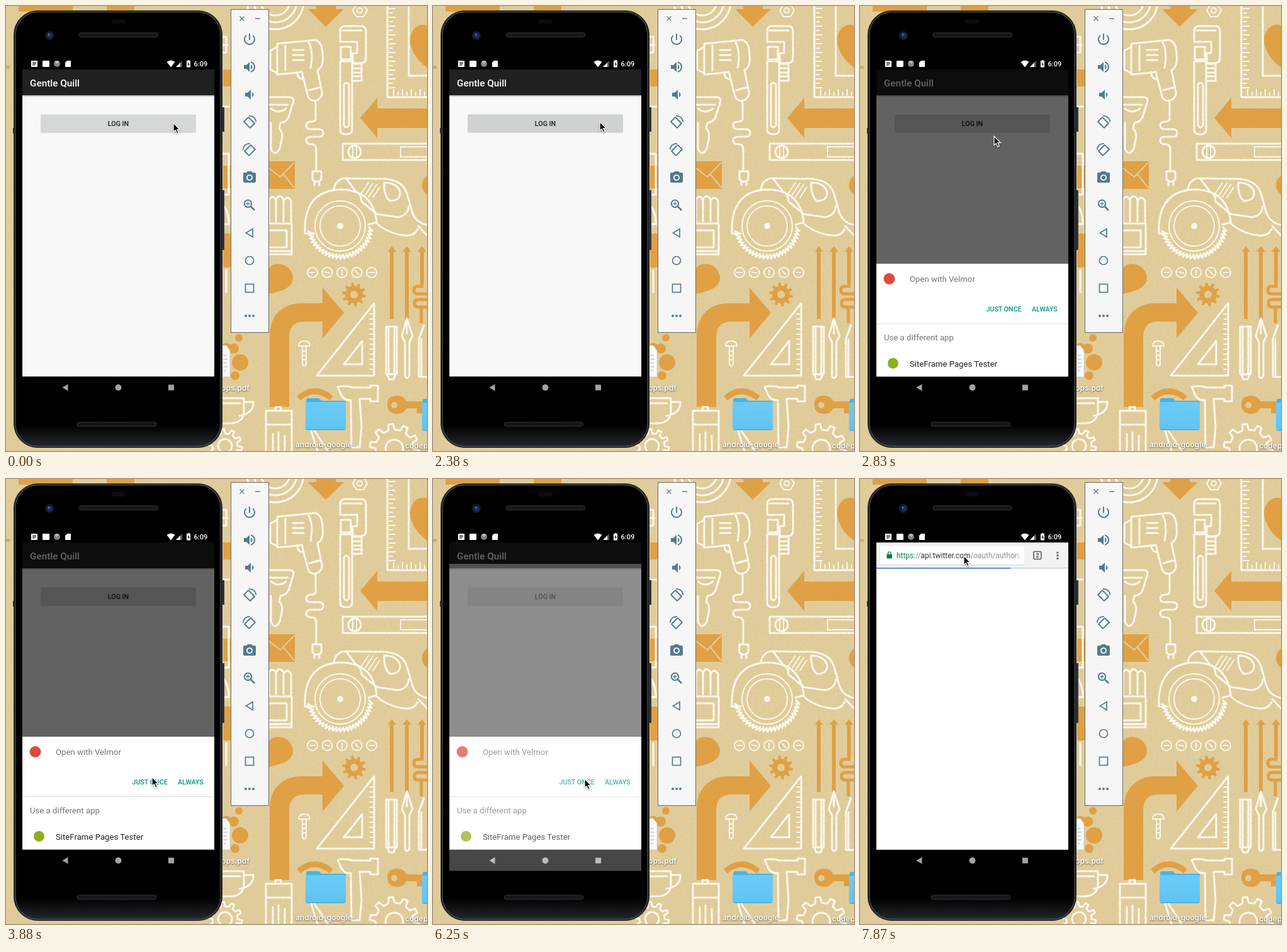
Recreate the animation shown at these times as an HTML page. Size 669 px wide and 708 px high, loop 8 s.

```html
<!DOCTYPE html>
<html lang="en">
<head>
<meta charset="utf-8">
<title>Phone log in</title>
<style>
html, body { margin: 0; width: 100%; height: 100%; overflow: hidden; background: #dfca98; }
svg { display: block; width: 100%; height: 100%; }
text { font-family: Roboto, sans-serif; font-size: 13.2px; }
.med { font-weight: 500; }
.line { fill: none; stroke: #fffaf0; stroke-width: 3; stroke-linecap: round; stroke-linejoin: round; }
.thin { stroke-width: 2; }
.solid { fill: #fffaf0; stroke: none; }
.orange { fill: #e1a043; }
.orange-line { fill: none; stroke: #e1a043; }
.label { font: 600 12px Inter, sans-serif; fill: #fff; filter: drop-shadow(0 1px 1px #0009); }
.tool { fill: #537a8b; }
.tool-line { fill: none; stroke: #537a8b; stroke-width: 2; }
.hint { fill: #757575; }
.teal { fill: #009688; }
.small { font-size: 10.7px; font-weight: 500; }

.anim { animation: 8s step-end infinite; }
#cursor { animation-name: cursor; }
#press { animation-name: press; }
#dim { animation-name: dim; }
#sheet { animation-name: sheet; }
#blank { animation-name: blank; }
#ready { animation-name: ready; }
#ripple { animation-name: ripple; }
#page { animation-name: page; }
#bar { animation-name: bar; }
#url { animation-name: url; }
#load { animation-name: load; transform-origin: 26px 0; }

@keyframes cursor {
  0% { transform: translate(266px, 186px); }
  5.5% { transform: translate(266px, 187px); }
  7.375% { transform: translate(266px, 185px); }
  13% { transform: translate(265px, 184px); }
  31.625% { transform: translate(260px, 184px); }
  33.5% { transform: translate(246px, 189px); }
  35.375% { transform: translate(213px, 207px); }
  37.25% { transform: translate(190px, 330px); }
  39.125% { transform: translate(181px, 446px); }
  42.875% { transform: translate(184px, 452px); }
  44.75% { transform: translate(194px, 461px); }
  46.625% { transform: translate(211px, 469px); }
  48.5% { transform: translate(232px, 474px); }
  50.25% { transform: translate(253px, 476px); }
  52.125% { transform: translate(269px, 475px); }
  54% { transform: translate(279px, 473px); }
  55.875% { transform: translate(283px, 471px); }
  63.375% { transform: translate(248px, 477px); }
  65.25% { transform: translate(241px, 477px); }
  80% { transform: translate(240px, 468px); }
  81.75% { transform: translate(230px, 390px); }
  83.625% { transform: translate(212px, 287px); }
  87.25% { transform: translate(207px, 265px); }
  89.125% { transform: translate(196px, 222px); }
  91% { transform: translate(183px, 176px); }
  92.875% { transform: translate(173px, 144px); }
  94.625% { transform: translate(167px, 128px); }
  96.5%, 100% { transform: translate(165px, 122px); }
}
@keyframes press {
  0% { opacity: 0; }
  24.25% { opacity: .03; }
  26.125% { opacity: .024; }
  31.625%, 100% { opacity: 0; }
}
@keyframes dim {
  0% { opacity: 0; }
  31.625% { opacity: .105; }
  33.5% { opacity: .5; }
  35.375%, 100% { opacity: .6; }
}
@keyframes sheet {
  0% { opacity: 0; }
  31.625% { opacity: .82; transform: translateY(14px); }
  33.5%, 100% { opacity: 1; transform: none; }
}
@keyframes blank {
  0% { opacity: 1; }
  33.5%, 100% { opacity: 0; }
}
@keyframes ready {
  0% { opacity: 0; }
  33.5%, 100% { opacity: 1; }
}
@keyframes ripple {
  0% { opacity: 0; }
  70.875% { opacity: .06; }
  72.75% { opacity: .1; }
  74.625% { opacity: .07; }
  76.375%, 100% { opacity: 0; }
}
@keyframes page {
  0% { opacity: 0; transform: translateY(34px); }
  78.125% { opacity: .28; transform: translateY(34px); }
  80% { opacity: .96; transform: translateY(5px); }
  81.75%, 100% { opacity: 1; transform: none; }
}
@keyframes bar {
  0% { opacity: 0; }
  81.75%, 100% { opacity: 1; }
}
@keyframes url {
  0% { opacity: 0; }
  87.25%, 100% { opacity: 1; }
}
@keyframes load {
  0% { transform: scaleX(0); }
  87.25% { transform: scaleX(.1); }
  89.125% { transform: scaleX(.28); }
  91% { transform: scaleX(.44); }
  92.875% { transform: scaleX(.55); }
  94.625% { transform: scaleX(.63); }
  96.5% { transform: scaleX(.67); }
  98.375%, 100% { transform: scaleX(.7); }
}
</style>
</head>
<body>
<svg viewBox="0 0 669 708" preserveAspectRatio="none">
<defs>
  <filter id="grain" x="0" y="0" width="100%" height="100%">
    <feTurbulence type="fractalNoise" baseFrequency=".28" numOctaves="3" seed="4"/>
    <feColorMatrix values="0 0 0 0 .5  0 0 0 0 .38  0 0 0 0 .18  1.1 0 0 0 -.5"/>
  </filter>
  <linearGradient id="foot" x2="0" y2="1">
    <stop offset=".95" stop-color="#000"/><stop offset="1" stop-color="#25272b"/>
  </linearGradient>
  <linearGradient id="blue" x2="0" y2="1">
    <stop offset="0" stop-color="#6ccbf7"/><stop offset="1" stop-color="#5fc4f3"/>
  </linearGradient>
  <linearGradient id="fade"><stop offset="0" stop-color="#fff" stop-opacity="0"/><stop offset="1" stop-color="#fff"/></linearGradient>
  <pattern id="weave" width="4" height="4" patternUnits="userSpaceOnUse">
    <rect width="4" height="4" fill="#f8f8f8"/><path d="M0 4L4 0" stroke="#f0f0f0"/>
  </pattern>
  <clipPath id="screen"><rect x="26" y="101" width="305" height="523"/></clipPath>
  <clipPath id="box"><rect x="32" y="107" width="224" height="29"/></clipPath>
</defs>

<!-- wallpaper -->
<rect width="669" height="708" fill="#e1cd9b"/>
<g class="orange">
  <path d="M20 0H106V9H20zM160 0h44v8h-44zM345 101h12v27h-12zM345 254h12v36h-12zM345 362h12v54h-12z"/>
  <path d="M493 0h31v5h13L508 33 480 5h13z"/>
  <path d="M669 31q-12-4-21 6-10 14-3 31 6 17 24 30z"/>
  <path d="M563 178L590 146v17h79v31h-79v16z"/>
  <rect x="418" y="247" width="41" height="44"/>
  <path d="M669 270q-8 6-8 15t8 15z"/>
  <path d="M418 417q7-9 20-6 15 4 18 20 1 13-16 21-12 4-22 6z"/>
  <path d="M419 638V524C419 492 441 473 468 473H503V448L537 488 503 529V502H474Q450 502 450 528V638z"/>
  <path id="cog" fill-rule="evenodd"/>
  <circle cx="370" cy="528" r="6"/><circle cx="372" cy="567" r="13"/><circle cx="362" cy="545" r="8"/><circle cx="364" cy="588" r="7"/><circle cx="350" cy="545" r="9"/>
  <path fill-rule="evenodd" d="M621 620q12 0 15 9h33v11h-8v8h-8v-8h-17q-4 9-15 9-15-1-15-15t15-14zm-4 10a5 5 0 1 0 .1 0z"/>
  <path d="M607 391l6-9 7 9h-4v107h-6V391zM630 391l7-9 7 9h-4v107h-6V391zM654 391l7-9 7 9h-4v50h-6v-50z"/>
</g>
<g class="orange-line">
  <path d="M465 624q25-22 52 0" stroke-width="9"/>
  <path d="M479 634q12-10 25 0" stroke-width="6"/>
  <path d="M661 440v6h-7q-6 0-6 6t6 6h20M669 467h-14q-6 0-6 6t6 6h14M660 480v25" stroke-width="5"/>
</g>
<path d="M418 258l18 14 22-23M441 268l17 21" fill="none" stroke="#e5cf9d" stroke-width="2"/>

<g class="line">
  <!-- rings, nut, pipe wrench -->
  <circle cx="428" cy="-8" r="45"/><circle cx="428" cy="-8" r="34"/><circle cx="428" cy="-8" r="23"/>
  <path class="thin" d="M551 7l6-10h11l6 10-6 10h-11z"/><circle class="thin" cx="562" cy="7" r="4"/>
  <path d="M531 57V40q0-8 8-8h26q7 0 7 8v42q0 9-9 9h-12V75h7V57zM535 39h30M532 65h16v20h-16z"/>
  <path d="M551 92h14v27h-14M551 99h14M551 106h14M551 112h14M531 88h19v109q0 7-9 7-10 0-10-7zM537 125q4-6 8 0v65q-4 6-8 0z"/>
  <!-- ruler -->
  <path d="M606 0V145H669M640 0V111H669"/><path id="rule" class="thin"/>
  <!-- drill -->
  <path d="M431 60l60-6q12 3 12 24 2 19-8 24l7 35q1 9-8 13-10 3-14-6l-10-39-17 2-22 2zM431 65l-11 6v30l11 6M444 63v40M481 58q8 15 3 40M456 70h17M456 78h17M456 86h17M463 105q0 12 10 11M482 134l18-5"/>
  <path d="M492 152v27q0 5-7 5-8 0-8 6t8 6h12q7 0 7 6t-7 6h-12q-8 0-8 6t8 6q8 0 8 8v35M487 263h14v13q-7 7-14 0zM490 278v7M498 278v7"/>
  <!-- trowel -->
  <path d="M418 145h33q6 0 6 6l-8 26q-4 8-13 9l-2 9q7 6 4 18l-3 14q-8 14-14 0V186M418 157h30M421 163q11 10 24 0"/>
  <!-- level -->
  <rect x="535" y="219" width="150" height="26"/><circle cx="554" cy="232" r="10"/><path class="thin" d="M551 223v18M557 223v18"/><rect class="thin" x="627" y="224" width="50" height="16"/>
  <!-- circular saw -->
  <path d="M475 350q3-57 57-58 52 1 57 52l-13 4M475 350v12h14"/>
  <path id="teeth"/>
  <circle class="thin" cx="531" cy="350" r="40"/><circle class="thin" cx="531" cy="350" r="32"/><circle class="solid" cx="531" cy="350" r="5"/>
  <path d="M521 292q2-15 16-18l52 1q40-2 48 23l8 28q5 20 28 23M589 346q18 16 45 19 14 2 20-10M541 275l14 19q10 5 10 17l24 20 34 5q16-3 17-17M601 281q20 0 25 14 2 15-16 15-10-8-9-29zM655 350l14 15"/>
  <path class="thin" d="M564 299l12-18M570 302l13-20M576 304l13-20M583 305l11-17"/>
  <!-- glove -->
  <path d="M418 345V308q5-9 11 0v34-34q6-11 12 0v34-32q6-10 12 0v36M418 346h36v49h-36M418 357h28v27h-28M418 390h36"/>
  <path id="screws" class="thin"/>
  <!-- set square and bolt -->
  <path d="M585 473V588H494zM566 533V570H537z"/><path id="scale" class="thin"/>
  <path class="thin" d="M465 541q0-8 9-8t9 8zM471 541v29q3 6 6 0v-29M471 549h6M471 556h6M471 563h6"/>
  <!-- pens -->
  <path d="M604 510h17v76h-17zM608 510v76M617 510v76M606 586l3 8h7l3-8M637 497l-8 28 5 10v53q3 8 7 0v-53l5-10zM637 497v24M664 508l-8 22v60h14M660 530v58"/>
  <!-- hammer -->
  <path d="M527 606q12-3 24 1h28v-3h12v25h-12v-4h-17l3 45-3 32h-13l-1-75q-13 1-17-12z"/>
  <!-- brush, gears, cup -->
  <path d="M413 708v-42h41v42M413 666v-22h41v22M424 708v-27M433 708v-30M443 708v-24M428 644v-6h9v6"/>
  <path id="gearA"/><path id="gearB"/><circle cx="617" cy="704" r="14"/><circle cx="348" cy="700" r="11"/>
  <path d="M340 624h38v21q0 17-20 19h-18M378 630h15q1 18-22 22M340 632h32M485 676l10 32M490 676l22 32"/>
  <path d="M340 49h10v25h-10M340 160h14M340 235h14v65h-14M340 312q14 10 14 35h-14M350 420v35M342 62h10"/>
</g>
<rect width="669" height="708" filter="url(#grain)" opacity=".35"/>
<path d="M0 95h5l2 2-2 3H0z" fill="#b39a68" opacity=".6"/>

<!-- desktop items -->
<g>
  <path d="M330 540h20l6 8v42h-26z" fill="#fafafa" stroke="#bbb" stroke-width=".5"/>
  <path d="M345 556h6M345 562h7M345 568h6M345 574h7M345 580h5" stroke="#aaa"/>
  <g id="folder"><path d="M477 632v-5q0-3 3-3h17l4 4h36q3 0 3 3v4z" fill="#45b4e6"/><rect x="476" y="630" width="64" height="45" rx="3" fill="url(#blue)"/><path d="M478 674h60" stroke="#48acd9" stroke-width="1.5"/></g>
  <use href="#folder" x="185" y="1"/>
  <text class="label" x="387" y="612" text-anchor="end">ops.pdf</text>
  <text class="label" x="507.5" y="702" text-anchor="middle">android-google-</text>
  <text class="label" x="634" y="704">codepath</text>
</g>

<!-- phone -->
<path d="M344 161h3v39h-3zM344 293h3v95h-3zM11 194h2v9h-2z" fill="#303238"/>
<rect x="12.500" y="7.500" width="331" height="695" rx="38" fill="#17181b" stroke="#2b2d32"/>
<rect x="15" y="9.500" width="326" height="691" rx="36" fill="url(#foot)" stroke="#4a4d54" stroke-width="1.300"/>
<path d="M168 21h21v7h-21z" fill="#0d0d10"/>
<g fill="#1c1c1e" stroke="#2b2b2d">
  <rect x="116" y="42.500" width="126" height="7" rx="3.500"/><rect x="113" y="662" width="126" height="7" rx="3.500"/>
</g>
<g stroke="#101012" stroke-dasharray="2 2" stroke-width="3"><path d="M119 46H240M116 665.500H237"/></g>
<circle cx="69" cy="47" r="7" fill="#171b2c"/><circle cx="69.500" cy="47" r="4" fill="#17306b"/><circle cx="68" cy="45.500" r="1.300" fill="#5c82c4"/>

<!-- status bar -->
<g fill="#fff">
  <path fill-rule="evenodd" d="M40 87h10v10H40zM42 89.500v1h6v-1zm0 2v1h6v-1zm0 2v1h4v-1z"/>
  <rect x="58" y="87" width="11" height="10" rx="1"/>
  <circle cx="81" cy="92" r="5" fill="#858585"/><path d="M77 89a5 5 0 0 1 8 0l-4 3z" fill="#b9b9b9"/>
  <path d="M97 87h6v10h-9v-7z"/>
  <path d="M255.500 89q6.500-5 13 0l-6.500 8.500z"/>
  <path d="M280 87v10h-10z" opacity=".35"/><path d="M277 90v7h-7z"/>
  <path fill-rule="evenodd" d="M288 87h1v-1h2.500v1h1.500v10.500h-6V87zm2.500 2l-2 4h1.500v3l2-4h-1.500z"/>
  <text class="med" x="298.500" y="96" style="font-size:11px">6:09</text>
</g>

<g clip-path="url(#screen)">
  <rect x="26" y="589" width="305" height="35"/>
  <g fill="#a2a2a2"><path d="M89.500 607l9-5.500v11z"/><circle cx="178.500" cy="607" r="5"/><rect x="258" y="602.500" width="9" height="9"/></g>

  <!-- app -->
  <rect x="26" y="142" width="305" height="447.500" fill="#f8f8f8"/>
  <rect x="26" y="142" width="305" height="1.500" fill="#000" opacity=".25"/><rect x="26" y="143.500" width="305" height="1.500" fill="#000" opacity=".07"/>
  <rect x="26" y="101" width="305" height="41" fill="#212121"/>
  <text class="med" x="38" y="127.500" fill="#fff" style="font-size:15.300px">Gentle Quill</text>
  <rect x="55" y="173.500" width="247" height="28.500" rx="2" fill="#000" opacity=".12"/>
  <rect x="55" y="172.500" width="247" height="28.500" rx="2" fill="#d6d7d7"/>
  <rect id="press" class="anim" x="55" y="172.500" width="247" height="28.500" rx="2"/>
  <text class="small" x="178.500" y="191" text-anchor="middle" fill="#1c1c1c">LOG IN</text>
  <rect id="dim" class="anim" x="26" y="101" width="305" height="488.500"/>

  <!-- chooser -->
  <g id="sheet" class="anim">
    <rect x="26" y="410" width="305" height="179.500" fill="#fff"/>
    <rect x="26" y="505" width="305" height="1" fill="#dcdcdc"/>
    <text class="hint" x="38" y="532">Use a different app</text>
    <g id="blank" class="anim">
      <circle cx="46.500" cy="434" r="9" fill="#e6e6e6"/><circle cx="52.500" cy="568.500" r="9" fill="#e6e6e6"/>
      <text class="hint" x="79" y="439">Open with</text>
      <g fill="#d8d8d8"><text class="small" x="200.500" y="485.500">JUST ONCE</text><text class="small" x="273" y="485.500">ALWAYS</text></g>
    </g>
    <g id="ready" class="anim">
      <circle cx="46.500" cy="434" r="9" fill="#dd4b3e"/><circle cx="52.500" cy="568.500" r="8.500" fill="#8fae1b"/>
      <text class="hint" x="79" y="439">Open with Velmor</text>
      <text x="79" y="574" fill="#212121">SiteFrame Pages Tester</text>
      <rect id="ripple" class="anim" x="194" y="468" width="68" height="27" rx="2"/>
      <g class="teal"><text class="small" x="200.500" y="485.500">JUST ONCE</text><text class="small" x="273" y="485.500">ALWAYS</text></g>
    </g>
  </g>

  <!-- browser -->
  <g id="page" class="anim">
    <rect x="26" y="101" width="305" height="488.500" fill="#fff"/>
    <g id="bar" class="anim">
      <rect x="26" y="101" width="305" height="41" fill="#f2f2f2"/>
      <rect x="32" y="108" width="229" height="29" rx="1" fill="#d9d9d9"/><rect x="32" y="107" width="229" height="29" rx="1" fill="#fff"/>
      <rect x="276" y="115.500" width="12" height="12" rx="1.500" fill="none" stroke="#5a5a5a" stroke-width="1.600"/>
      <text x="282" y="125" text-anchor="middle" fill="#5a5a5a" style="font-size:9px;font-weight:700">2</text>
      <g fill="#5a5a5a"><circle cx="314" cy="117" r="1.600"/><circle cx="314" cy="121.700" r="1.600"/><circle cx="314" cy="126.400" r="1.600"/></g>
      <rect x="26" y="141" width="305" height="1.500" fill="#cbcfdd"/>
    </g>
    <g id="url" class="anim" clip-path="url(#box)">
      <rect x="42.500" y="119.500" width="8.500" height="7" rx="1" fill="#0b8043"/><path d="M44.500 120v-2q0-2.200 2.200-2.200t2.200 2.200v2" fill="none" stroke="#0b8043" stroke-width="1.200"/>
      <text x="58" y="126" fill="#8c8c8c" style="font-size:11.900px"><tspan fill="#0b8043">https</tspan>://<tspan fill="#333">api.twitter.com</tspan>/oauth/authorize</text>
      <rect x="248" y="108" width="8" height="27" fill="url(#fade)"/>
    </g>
    <rect id="load" class="anim" x="26" y="141" width="305" height="1.700" fill="#4c80cb"/>
  </g>
</g>

<!-- emulator controls -->
<rect x="357.500" y="5.500" width="60" height="514" fill="url(#weave)" stroke="#6b6a64"/>
<path d="M371.500 16.500l7 7M378.500 16.500l-7 7M396 20h8" fill="none" stroke="#607d8b" stroke-width="1.300"/>
<g class="tool">
  <path transform="translate(375 41)" d="M13 3h-2v10h2V3zm4.830 2.170l-1.420 1.420C17.990 7.860 19 9.810 19 12c0 3.870-3.130 7-7 7s-7-3.130-7-7c0-2.190 1.010-4.140 2.580-5.420L6.170 5.170C4.230 6.820 3 9.260 3 12c0 4.970 4.030 9 9 9s9-4.030 9-9c0-2.740-1.230-5.180-3.170-6.830z"/>
  <path transform="translate(375 85)" d="M3 9v6h4l5 5V4L7 9H3zm13.500 3c0-1.770-1.020-3.290-2.500-4.030v8.050c1.480-.73 2.500-2.250 2.500-4.020zM14 3.230v2.060c2.890.86 5 3.540 5 6.710s-2.110 5.850-5 6.710v2.060c4.010-.91 7-4.490 7-8.770s-2.990-7.860-7-8.770z"/>
  <path transform="translate(375 129)" d="M18.500 12c0-1.770-1.020-3.290-2.500-4.030v8.050c1.480-.73 2.500-2.250 2.500-4.020zM5 9v6h4l5 5V4L9 9H5z"/>
  <path transform="translate(375 261)" fill-rule="evenodd" d="M9 2L7.170 4H4q-2 0-2 2v12q0 2 2 2h16q2 0 2-2V6q0-2-2-2h-3.170L15 2zm3 5a5 5 0 1 1-.1 0zm0 1.800a3.200 3.200 0 1 0 .1 0z"/>
  <circle cx="381" cy="493" r="2"/><circle cx="387" cy="493" r="2"/><circle cx="393" cy="493" r="2"/>
</g>
<g class="tool-line">
  <g id="turn"><rect x="381.500" y="178.500" width="10" height="14" rx=".5" transform="rotate(-45 386.500 185.500)"/><path d="M386 174.800q10-.3 11.500 9.700" stroke-width="1.700"/></g>
  <use href="#turn" transform="matrix(-1 0 0 1 774 44)"/>
  <circle cx="384.500" cy="314.500" r="5.700"/><path d="M389 319l6 6" stroke-width="2.600"/><path d="M381.500 314.500h6M384.500 311.500v6" stroke-width="1.300"/>
  <path d="M381.500 361l10.500-6.500v13z" stroke-width="1.700"/>
  <circle cx="387" cy="405" r="6.500" stroke-width="1.700"/>
  <rect x="380.500" y="442.500" width="13" height="13" stroke-width="1.700"/>
</g>

<g id="cursor" class="anim">
  <path d="M0 0V14.500L3.300 11.500 5.700 17 8.200 16 5.900 10.700H10.300Z" stroke="#fff" stroke-width="1.300" style="filter:drop-shadow(0 1px 1px #0006)"/>
</g>
</svg>
<script>
const draw = (id, d) => document.getElementById(id).setAttribute('d', d);
const range = (n, f) => Array.from({ length: n }, (_, i) => f(i)).join('');
const at = (cx, cy, r, a) => `${(cx + r * Math.cos(a)).toFixed(1)} ${(cy + r * Math.sin(a)).toFixed(1)}`;

function gear(cx, cy, inner, outer, n) {
  const step = 2 * Math.PI / n;
  const tooth = i => [[inner, 0], [outer, .12], [outer, .42], [inner, .54]]
    .map(([r, k]) => 'L' + at(cx, cy, r, (i + k) * step)).join('');
  return 'M' + range(n, tooth).slice(1) + 'Z';
}

draw('cog', gear(553, 459, 14, 19, 10) + 'M553 453a6 6 0 1 0 .1 0z');
draw('gearA', gear(617, 704, 30, 39, 10));
draw('gearB', gear(348, 700, 20, 27, 10));
// saw blade: a ramp out, then a straight step back in
draw('teeth', 'M' + range(25, i => [46, 52].map((r, k) => 'L' + at(531, 350, r, .05 + (i + k * .85) * .118)).join('')).slice(1));
draw('rule', range(19, i => `M609 ${4 + i * 7}h${i % 2 ? 5 : 9}`) + range(8, i => `M${616 + i * 7} 142v${i % 2 ? -5 : -9}`));
draw('scale', range(12, i => `M583 ${490 + i * 8}h-5`));
draw('screws', [0, .2, 1.57, .8, 0].map((a, i) => {
  const x = 487 + i * 23.5;
  return `M${x - 8} 424a8 8 0 1 0 16 0a8 8 0 1 0-16 0M${at(x, 424, 4, a)}L${at(x, 424, 4, a + Math.PI)}`;
}).join(''));
</script>
</body>
</html>
```
